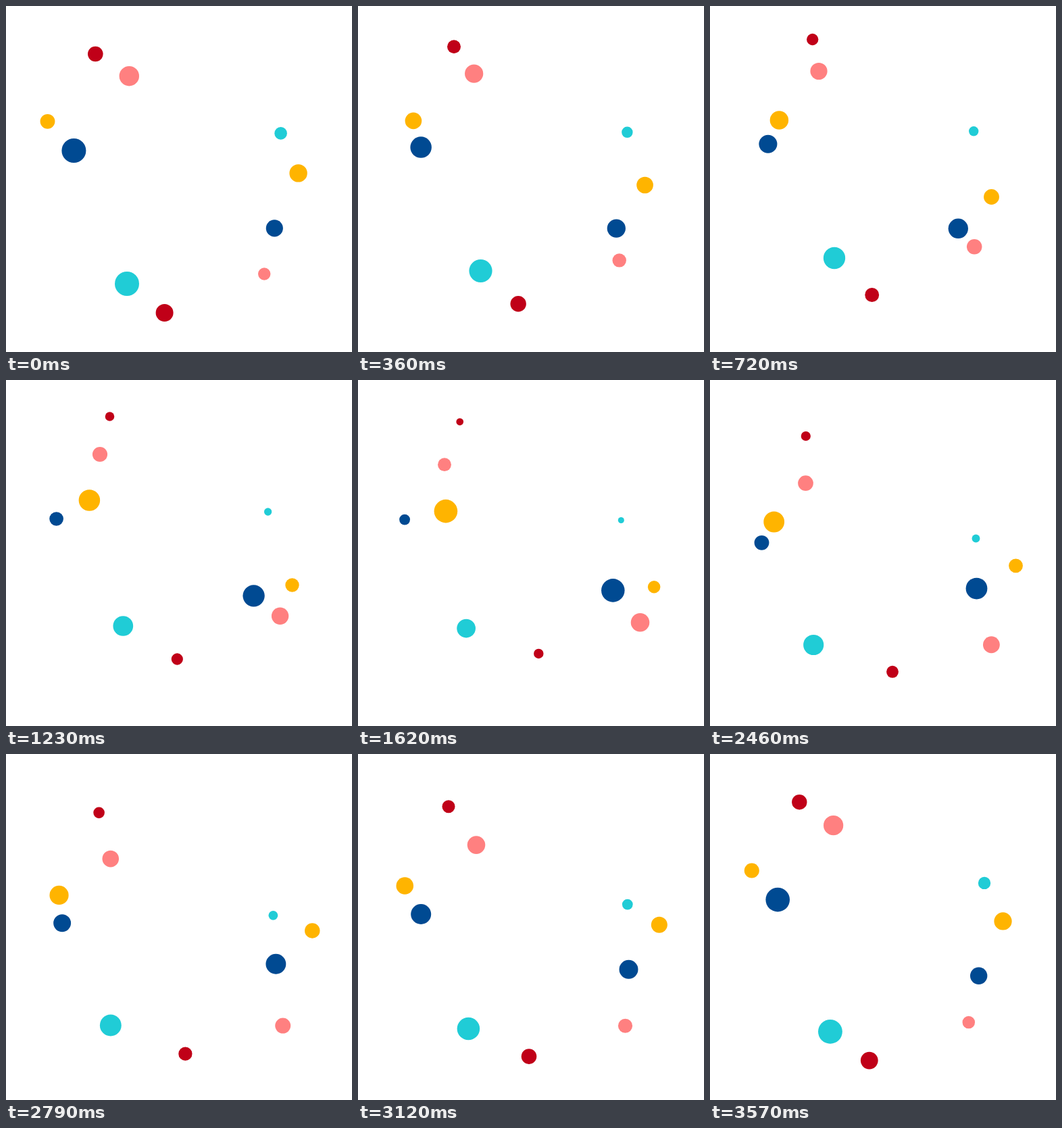
Recreate the animation shown at these times as an HTML page with a canvas. Size 512 by 512 pixels, loop 3.6 s.

```html
<!DOCTYPE html>
<html lang="en">
<head>
<meta charset="utf-8">
<title>Drifting dots</title>
<style>
  html, body { margin: 0; width: 100%; height: 100%; overflow: hidden; background: #fff; }
  canvas { display: block; width: 100vmin; height: 100vmin; }
</style>
</head>
<body>
<canvas id="stage" width="512" height="512"></canvas>
<script>
const ctx = document.getElementById('stage').getContext('2d');
const LOOP = 3600, STEP = 30, QUARTER = LOOP / 4;
const RED = '#c00018', PINK = '#ff8080', YELLOW = '#ffb400', NAVY = '#004a92', CYAN = '#20ccd6';

// Times at which each path point is passed.
const TIMES = [0, 720, 1230, 2010, 2460, 3120];

// Colour, radius at the start, radius at mid-loop, path points.
const dots = [
  [RED, 11.3, 4.7, [132.3, 71], [151.7, 49.5], [153.5, 54], [147.2, 70], [141.8, 83], [134, 77.7]],
  [PINK, 14.7, 9.4, [182.3, 103.7], [161, 96.5], [139, 110], [131, 138], [141.5, 152.7], [175, 134.6]],
  [YELLOW, 10.9, 18, [61.5, 170.8], [102.4, 169], [123.4, 178], [119.2, 205.5], [94.7, 210], [69.3, 195]],
  [NAVY, 18, 6.8, [100.4, 214], [85.9, 204.2], [74.6, 205.5], [70.6, 217], [76.5, 240.8], [93.2, 237]],
  [CYAN, 9.3, 4, [406.6, 188.4], [390.2, 185.3], [387.6, 195], [391.2, 220], [393.5, 234.5], [398.8, 222.6]],
  [YELLOW, 13.2, 8.8, [432.6, 247.4], [416.5, 282.5], [423.5, 303.5], [447.7, 294.2], [452.5, 274.8], [445.8, 252.8]],
  [NAVY, 12.6, 17.8, [397.3, 328.8], [367.3, 329.3], [366.6, 319.3], [386.8, 309], [394.5, 308.6], [400.5, 318.8]],
  [PINK, 9.2, 14.3, [382.2, 396.5], [391.2, 356.3], [405.6, 349.3], [420.3, 373.8], [416.4, 391.8], [395.5, 402.2]],
  [CYAN, 18, 13.4, [179, 411], [184, 373], [173.3, 364], [154, 377.2], [153.2, 392], [163.4, 406.5]],
  [RED, 13, 6.6, [234.6, 454], [239.7, 427.5], [253.3, 413], [272.4, 411.3], [270, 431.8], [253, 447.6]],
].map(([color, r0, r1, ...points]) => ({ color, r0, r1, points }));

const line = (t, ta, a, tb, b) => a + (b - a) * (t - ta) / (tb - ta);

// Parabola through three timed values.
function arc(t, ta, a, tb, b, tc, c) {
  const bend = ((c - b) / (tc - tb) - (b - a) / (tb - ta)) / (tc - ta);
  return line(t, ta, a, tb, b) + bend * (t - ta) * (t - tb);
}

// Quarters alternate between straight runs and arcs that join them.
function coordinate(points, axis, t) {
  const v = points.map(p => p[axis]);
  const first = time => line(time, TIMES[0], v[0], TIMES[1], v[1]);
  const third = time => line(time, TIMES[3], v[3], TIMES[4], v[4]);
  switch (Math.floor(t / QUARTER)) {
    case 0: return first(t);
    case 1: return arc(t, QUARTER, first(QUARTER), TIMES[2], v[2], 2 * QUARTER, third(2 * QUARTER));
    case 2: return third(t);
    default: return arc(t, 3 * QUARTER, third(3 * QUARTER), TIMES[5], v[5], LOOP, v[0]);
  }
}

function draw(t) {
  ctx.fillStyle = '#fff';
  ctx.fillRect(0, 0, 512, 512);
  const growth = 1 - Math.abs(t / (LOOP / 2) - 1);
  for (const { color, r0, r1, points } of dots) {
    ctx.fillStyle = color;
    ctx.beginPath();
    ctx.arc(coordinate(points, 0, t), coordinate(points, 1, t), r0 + (r1 - r0) * growth, 0, 2 * Math.PI);
    ctx.fill();
  }
}

const start = performance.now();
function tick() {
  const elapsed = (performance.now() - start) % LOOP;
  draw(Math.floor(elapsed / STEP) * STEP);
  requestAnimationFrame(tick);
}
tick();
</script>
</body>
</html>
```
